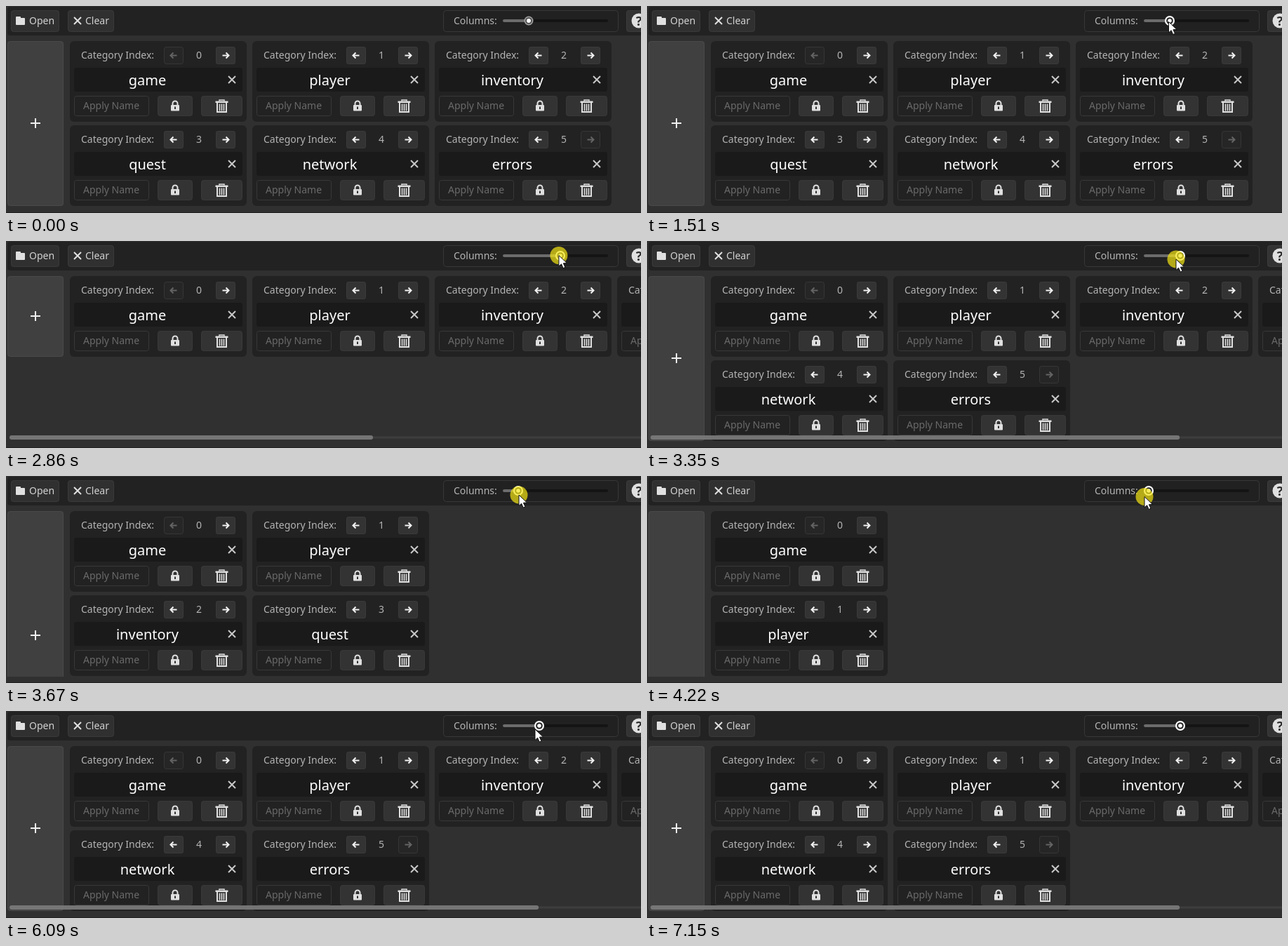
Recreate the animation shown at these times as an HTML page with a canvas. Size 905 by 295 pixels, loop 8320 ms.

```html
<!DOCTYPE html>
<html lang="en">
<head>
<meta charset="utf-8">
<title>Category columns</title>
<style>
  html, body { margin: 0; width: 100%; height: 100%; overflow: hidden; background: #303030; }
  canvas { display: block; width: 905px; height: 295px; }
</style>
</head>
<body>
<canvas id="stage" width="905" height="295"></canvas>
<script>
const ctx = document.getElementById('stage').getContext('2d');
const LOOP = 8320;
const W = 905, H = 295;
const names = ['game', 'player', 'inventory', 'quest', 'network', 'errors'];
const ICON = '#e0e0e0';

const ease = {
  both: p => p * p * (3 - 2 * p),
  out: p => 1 - (1 - p) ** 2,
  in: p => p ** 1.6,
  line: p => p
};

// Pointer keys: time, x, y, easing towards this key
const path = [
  [200, 648, 304],
  [1070, 738, 43, 'out'],
  [1110, 738, 43, 'line'],
  [1510, 743.5, 22.5, 'both'],
  [1570, 743.5, 22.5, 'line'],
  [1880, 771, 22, 'both'],
  [1930, 771, 22, 'line'],
  [2330, 792, 20.5, 'both'],
  [2570, 788.5, 20.5, 'both'],
  [2820, 788.5, 20.5, 'line'],
  [3350, 754, 26, 'both'],
  [3670, 731, 27, 'both'],
  [4220, 709, 29.5, 'both'],
  [4480, 709, 29.5, 'line'],
  [5210, 754, 26, 'both'],
  [6090, 754, 26, 'line'],
  [6300, 739, 27, 'both'],
  [6470, 739, 27, 'line'],
  [7150, 655, 298, 'in']
];
const pressAt = 1550, releaseAt = 6090, hoverAt = 1300;

function pointerAt(t) {
  const i = path.findIndex(k => k[0] > t);
  if (i < 1) return null;
  const a = path[i - 1], b = path[i];
  const p = ease[b[3]]((t - a[0]) / (b[0] - a[0]));
  return { x: a[1] + (b[1] - a[1]) * p, y: a[2] + (b[2] - a[2]) * p };
}

function columnsAt(t, pointer) {
  if (t < pressAt) return 3;
  if (t >= releaseAt) return 4;
  return Math.max(1, Math.min(6, Math.round((pointer.x - 743.5) / 15) + 3));
}

function box(x, y, w, h, r, fill, border) {
  ctx.beginPath();
  ctx.roundRect(x, y, w, h, r);
  ctx.fillStyle = fill;
  ctx.fill();
  if (!border) return;
  ctx.beginPath();
  ctx.roundRect(x + 0.5, y + 0.5, w - 1, h - 1, r);
  ctx.lineWidth = 1;
  ctx.strokeStyle = border;
  ctx.stroke();
}

function text(str, x, y, color, size = 14, align = 'left', weight = 400) {
  ctx.font = `${weight} ${size}px "Noto Sans", sans-serif`;
  ctx.textAlign = align;
  ctx.fillStyle = color;
  ctx.fillText(str, x, y);
}

function lines(color, width, ...polys) {
  ctx.beginPath();
  for (const poly of polys) {
    poly.forEach(([x, y], i) => i ? ctx.lineTo(x, y) : ctx.moveTo(x, y));
  }
  ctx.strokeStyle = color;
  ctx.lineWidth = width;
  ctx.stroke();
}

function disc(x, y, r, color) {
  ctx.beginPath();
  ctx.arc(x, y, r, 0, Math.PI * 2);
  ctx.fillStyle = color;
  ctx.fill();
}

function rect(x, y, w, h, color) {
  ctx.fillStyle = color;
  ctx.fillRect(x, y, w, h);
}

function cross(x, y, r, color) {
  lines(color, 2, [[x - r, y - r], [x + r, y + r]], [[x + r, y - r], [x - r, y + r]]);
}

function arrowButton(x, y, dir, enabled) {
  box(x, y, 28, 25, 3, enabled ? '#333333' : '#262626', enabled ? '#3a3a3a' : '#363636');
  const cx = x + 14, cy = y + 12.5, tip = cx + dir * 4;
  lines(enabled ? '#f0f0f0' : '#636363', 2,
    [[cx - dir * 4.5, cy], [tip, cy]],
    [[cx + dir * 0.5, cy - 4], [tip + dir * 0.5, cy], [cx + dir * 0.5, cy + 4]]);
}

function lockIcon(x, y) {
  box(x - 6, y - 1, 12, 8.5, 1, ICON);
  ctx.beginPath();
  ctx.moveTo(x - 3.5, y);
  ctx.lineTo(x - 3.5, y - 3);
  ctx.arc(x, y - 3, 3.5, Math.PI, 0);
  ctx.lineTo(x + 3.5, y);
  ctx.strokeStyle = ICON;
  ctx.lineWidth = 2;
  ctx.stroke();
  rect(x - 1, y + 1.5, 2, 3.5, '#333333');
}

function trashIcon(x, y) {
  lines(ICON, 1.5, [[x - 3.5, y - 7], [x - 3.5, y - 8.5], [x + 3.5, y - 8.5], [x + 3.5, y - 7]]);
  rect(x - 9, y - 7, 18, 2.5, ICON);
  lines(ICON, 2, [[x - 6.5, y - 5], [x - 6.5, y + 8.5], [x + 6.5, y + 8.5], [x + 6.5, y - 5]]);
  for (const dx of [-3, 0, 3]) rect(x + dx - 0.8, y - 3, 1.6, 10, ICON);
}

function card(i, x, y) {
  box(x, y, 252, 115, 6, '#222222');
  text('Category Index:', x + 16, y + 25, '#b4b4b4');
  arrowButton(x + 134, y + 8, -1, i > 0);
  text(String(i), x + 184, y + 25, '#b4b4b4', 14, 'center');
  arrowButton(x + 208, y + 8, 1, i < names.length - 1);

  box(x + 6, y + 38, 240, 34, 3, '#1a1a1a');
  text(names[i], x + 110.5, y + 63, '#ffffff', 20, 'center');
  cross(x + 231, y + 55, 5, '#c8c8c8');

  box(x + 6, y + 78, 107, 29, 3, '#222222', '#383838');
  text('Apply Name', x + 19, y + 97, '#6a6a6a');
  box(x + 125, y + 78, 50, 29, 4, '#333333', '#393939');
  lockIcon(x + 150, y + 92);
  box(x + 187, y + 78, 59, 29, 4, '#333333', '#393939');
  trashIcon(x + 216.5, y + 92.5);
}

function grid(cols) {
  const rows = Math.ceil(names.length / cols);
  const height = rows * 120 - 5;
  ctx.save();
  ctx.beginPath();
  ctx.rect(0, 42, W, 244);
  ctx.clip();

  box(2, 50, 80, height, 4, '#404040', '#4a4a4a');
  const cy = 49.5 + height / 2;
  lines('#f0f0f0', 2, [[35, cy], [49, cy]], [[42, cy - 7], [42, cy + 7]]);

  names.forEach((_, i) => card(i, 91 + (i % cols) * 260, 50 + Math.floor(i / cols) * 120));

  if (cols > 3) {
    box(5, 278.5, W, 3, 1.5, 'rgba(70,70,70,0.6)');
    box(5, 277, 860500 / (101 + cols * 260), 6, 3, 'rgba(126,126,126,0.88)');
  }
  ctx.restore();
}

function toolbar(cols, lit) {
  box(2, 1, W, 41, [4, 0, 0, 4], '#222222');

  box(7, 6, 69, 31, 4, '#303030', '#3a3a3a');
  box(14, 15, 7, 5, 1, ICON);
  box(14, 17, 13, 10, 1, ICON);
  text('Open', 33, 26, '#d2d2d2');

  box(88, 6, 66, 31, 4, '#303030', '#3a3a3a');
  cross(102, 21, 5, ICON);
  text('Clear', 113, 26, '#d2d2d2');

  box(623, 6, 250, 31, 4, '#212121', '#383838');
  text('Columns:', 638, 26, '#b4b4b4');
  const knob = 700 + cols * 15;
  box(708, 19, 150, 4, 2, '#141414');
  box(708, 19, knob - 708, 4, 2, '#6c6c6c');
  if (lit) {
    disc(knob, 21, 7, '#ffffff');
    disc(knob, 21, 4.8, '#222222');
    disc(knob, 21, 2.8, '#ffffff');
  } else {
    disc(knob, 21, 6.5, '#a0a0a0');
    disc(knob, 21, 4.8, '#4a4a4a');
    disc(knob, 21, 3, '#ffffff');
  }

  box(884, 6, 40, 31, 4, '#333333', '#3c3c3c');
  disc(902, 21, 10.5, ICON);
  text('?', 902, 27.5, '#2a2a2a', 18, 'center', 700);
}

function cursor({ x, y }) {
  const shape = [[0, 0], [0, 15.5], [3.6, 12.2], [6.2, 18], [9, 16.8], [6.4, 11.2], [11.5, 11]];
  ctx.beginPath();
  shape.forEach(([dx, dy]) => ctx.lineTo(x + dx, y + dy));
  ctx.closePath();
  ctx.fillStyle = '#ffffff';
  ctx.fill();
  ctx.strokeStyle = '#111111';
  ctx.lineWidth = 1;
  ctx.stroke();
}

function draw(t) {
  const pointer = pointerAt(t);
  const cols = columnsAt(t, pointer);
  rect(0, 0, W, H, '#303030');
  rect(0, 294, W, 1, '#222222');
  toolbar(cols, t >= hoverAt);
  grid(cols);
  if (pointer && t >= 240) {
    if (t >= pressAt && t < releaseAt) disc(pointer.x, pointer.y, 12.5, 'rgba(245,230,20,0.7)');
    cursor(pointer);
  }
}

const start = performance.now();
function tick() {
  draw((performance.now() - start) % LOOP);
  requestAnimationFrame(tick);
}
tick();
</script>
</body>
</html>
```
